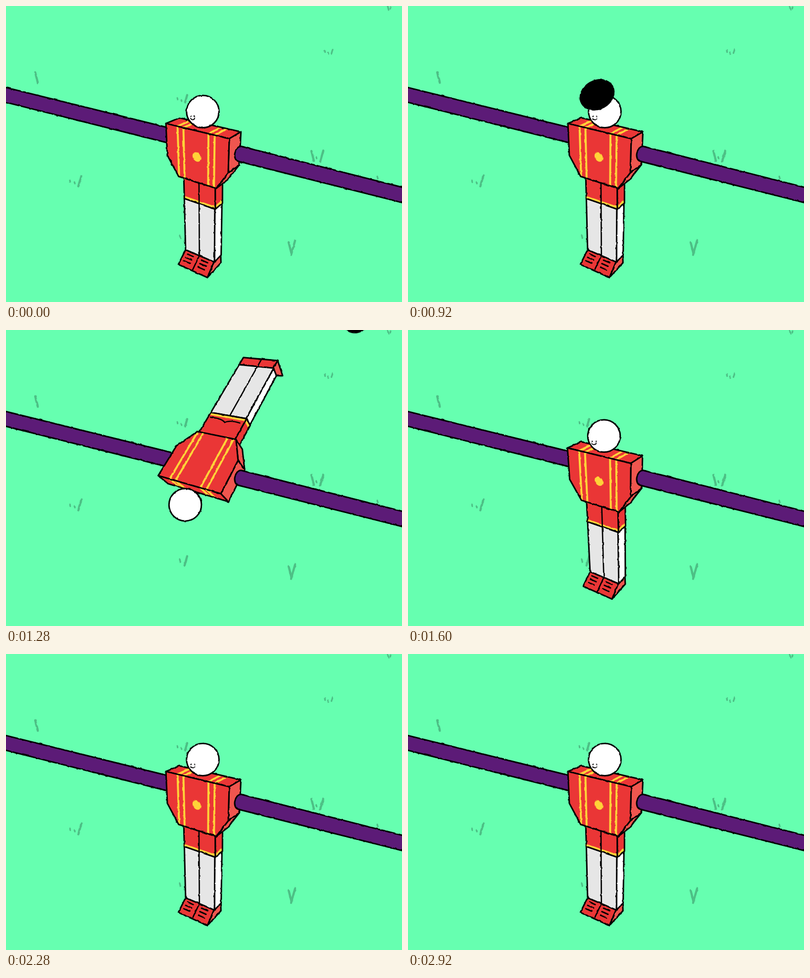
Animation of 800 by 600 pixels, one loop 3000 ms. Source, as an HTML page:

```html
<!DOCTYPE html>
<html lang="en">
<head>
<meta charset="utf-8">
<title>Table football header</title>
<style>
html, body { margin: 0; width: 100%; height: 100%; overflow: hidden; background: #66ffb0; }
svg { display: block; width: 100vw; height: 100vh; }
</style>
</head>
<body>
<svg viewBox="0 0 800 600" preserveAspectRatio="none">
  <defs>
    <filter id="rough" filterUnits="userSpaceOnUse" x="-20" y="-20" width="840" height="640" color-interpolation-filters="sRGB">
      <feTurbulence id="noise" type="fractalNoise" baseFrequency="0.13" numOctaves="1" seed="1"/>
      <feDisplacementMap in="SourceGraphic" scale="3" xChannelSelector="R" yChannelSelector="G"/>
    </filter>
  </defs>
  <rect width="800" height="600" fill="#66ffb0"/>
  <g filter="url(#rough)" stroke-linecap="round" stroke-linejoin="round">
    <g id="grass" fill="none" stroke="#4dbf85"></g>
    <path d="M-15 161.5L345 251V282L-15 191.5Z" fill="#5c1b77" stroke="#000" stroke-width="3"/>
    <g id="player"></g>
    <path d="M830 375L475 284.5C462 284 456 312 470 315L830 406Z" fill="#5c1b77" stroke="#000" stroke-width="3"/>
    <g id="ball"></g>
  </g>
</svg>
<script>
const RED = '#ea3636', SIDE = '#ef564f', YELLOW = '#ffd338', GREY = '#e6e6e6';
const LOOP = 3000;
const byId = id => document.getElementById(id);

// A left blade, a right blade leaning out, and a speck between them if there is room
function tuft(x, y, gap, left, right) {
  const blade = (bx, tall, slant) => tall
    ? `<path d="M${bx} ${y - tall / 2}l${tall * slant} ${tall}" stroke-width="${tall < 10 ? 3.2 : 4.4}"/>` : '';
  return blade(x, left, 0.25) + blade(x + gap, right, -0.28) +
    (gap > 15 ? `<path d="M${x + gap * 0.4} ${y + 2}l1 3" stroke-width="3.2"/>` : '');
}
byId('grass').innerHTML = [
  tuft(346, 188, 20, 3, 15), tuft(644, 92, 16, 3, 9), tuft(129, 355, 23, 3, 21),
  tuft(617, 304, 24, 20, 22), tuft(351, 468, 15, 6, 19), tuft(571, 490, 13, 22, 29),
  tuft(59, 145, 0, 21, 0), tuft(750, 348, 0, 5, 0), tuft(771, 4, 6, 8, 3)
].join('');

// Eased swing between a few poses: drawing number, lean in degrees
const poses = [[11, 0], [15, 131], [18, -8.5], [19, 1.8], [22, -1], [24, 0]];
function lean(step) {
  const i = poses.findIndex(p => step < p[0]);
  if (i < 1) return 0;
  const [s0, from] = poses[i - 1], [s1, to] = poses[i];
  const k = (step - s0) / (s1 - s0);
  return from + (to - from) * k * k * (3 - 2 * k);
}

const AXIS = -4; // height of the pivot
let cos = 1, sin = 0;

// a: along the rod, h: up the body, d: out of the chest
function project([a, h, d]) {
  const up = AXIS + (h - AXIS) * cos - d * sin, front = (h - AXIS) * sin + d * cos;
  const w = 1 - 0.00073 * a - 0.0006 * up - 0.00135 * front;
  return [399 + (a - 0.7 * front) / w, 281 + (0.26 * a - up + 0.39 * front) / w];
}

const pathOf = pts => 'M' + pts.map(p => project(p).map(v => v.toFixed(2)).join(' ')).join('L');
const line = (pts, color, width) =>
  `<path d="${pathOf(pts)}" fill="none" stroke="${color}" stroke-width="${width}"/>`;

function facing(pts) {
  const q = pts.map(project);
  return q.reduce((sum, [x, y], i) => {
    const [u, v] = q[(i + 1) % q.length];
    return sum + x * v - u * y;
  }, 0) > 0;
}

function face(pts, fill, detail = '') {
  if (!facing(pts)) return '';
  const d = pathOf(pts) + 'Z';
  return `<path d="${d}" fill="${fill}"/>${detail}<path d="${d}" fill="none" stroke="#000" stroke-width="3"/>`;
}

// Solid between a front and a back outline with the same number of corners
function prism(front, back, fill, side, detail = {}) {
  const edges = front.map((p, i) => {
    const j = (i + 1) % front.length;
    return face([p, back[i], back[j], front[j]], i ? side : fill, detail[i]);
  });
  return edges.join('') + face([...back].reverse(), fill, detail.back) + face(front, fill, detail.front);
}

function torso() {
  const shape = [[-63.5, 33.5], [60, 33.5], [60, -32], [38, -71], [-40, -71], [-63.5, -32]];
  const at = d => shape.map(p => [...p, d]);
  const stripes = (from, to) => [-39, -27, 22, 33.6].map(a =>
    line([[a, ...from], [a, ...to]], YELLOW, 4)).join('');
  const badge = Array.from({ length: 16 }, (_, i) => {
    const t = i * Math.PI / 8;
    return [-1 + 8.5 * Math.cos(t), -18 + 9.5 * Math.sin(t), 18];
  });
  return prism(at(18), at(-18), RED, SIDE, {
    0: stripes([33.5, 18], [33.5, -18]),
    back: stripes([33.5, -18], [-71, -18]),
    front: stripes([33.5, 18], [-71, 18]) + `<path d="${pathOf(badge)}Z" fill="${YELLOW}"/>`
  });
}

// Legs: the back is a little wider on the left than the front
const FRONT = 12, BACK = -11, HEM = -122, ANKLE = -251, SOLE = -272;
const slab = (top, bottom, d) => {
  const l = d < 0 ? -41 : -33.5;
  return [[l, top, d], [32, top, d], [33, bottom, d], [l, bottom, d]];
};
const seam = (top, bottom, d, e = d) => line([[-1, top, d], [-1, bottom, e]], '#000', 2.6);

function shorts() {
  const y = HEM + 3.5;
  const hem = d => line([[d < 0 ? -41 : -33.5, y, d], [32, y, d]], YELLOW, 4.5);
  const [p, q, r, s, t] = [[-36, -111], [-12, -113], [-3, -105], [3, -113], [25, -110]]
    .map(v => project([...v, BACK]).join(' '));
  const fold = `<path d="M${p}Q${q} ${r}Q${s} ${t}" fill="none" stroke="#000" stroke-width="2.6"/>`;
  return prism(slab(-66, HEM, FRONT), slab(-66, HEM, BACK), RED, RED, {
    1: line([[32, y, FRONT], [32, y, BACK]], YELLOW, 4.5),
    front: hem(FRONT) + seam(-66, HEM, FRONT),
    back: hem(BACK) + fold
  });
}

function socks() {
  return prism(slab(HEM, ANKLE, FRONT), slab(HEM, ANKLE, BACK), GREY, '#fff', {
    front: seam(HEM, ANKLE, FRONT), back: seam(HEM, ANKLE, BACK)
  });
}

function shoes() {
  const toe = 35;
  const front = slab(ANKLE, SOLE, FRONT).map(([a, h, d], i) => [a, h, i > 1 ? toe : d]);
  let laces = '';
  for (const mid of [-19, 14])
    for (const t of [0.2, 0.43, 0.66])
      laces += line([-7, 7].map(x => [mid + x, ANKLE + (SOLE - ANKLE) * t, FRONT + (toe - FRONT) * t]), '#000', 2.8);
  return prism(front, slab(ANKLE, SOLE, BACK), RED, SIDE, {
    front: laces + seam(ANKLE, SOLE, FRONT, toe),
    back: seam(ANKLE, SOLE, BACK),
    2: seam(SOLE, SOLE, toe, BACK)
  });
}

function head() {
  const [x, y] = project([0, 65, 2]);
  let out = `<circle cx="${x}" cy="${y}" r="32.8" fill="#fff" stroke="#000" stroke-width="3"/>`;
  if (0.85 * cos - 0.6 * sin > 0.1) {
    const fx = x - 20.3 * cos, fy = y + 29 * (0.39 * cos + sin);
    out += `<g transform="translate(${fx} ${fy})"><circle cx="-3.5" cy="-2.2" r="1.3"/><circle cx="3.8" cy="-1.5" r="1.3"/>` +
      '<path d="M-4.3 2.2Q-2.8 5.6 .2 5.4Q3 5 4 1.8" fill="none" stroke="#000" stroke-width="1.8"/></g>';
  }
  return out;
}

function player(step) {
  const angle = lean(step) * Math.PI / 180;
  cos = Math.cos(angle);
  sin = Math.sin(angle);
  const parts = [shoes(), socks(), shorts(), torso(), head()];
  const fromAbove = facing([[-60, 33, 18], [-60, 33, -18], [60, 33, -18], [60, 33, 18]]);
  return (fromAbove ? parts : parts.reverse()).join('');
}

// Flies in, is squashed on the head, hops over and is heeled away
function ball(step) {
  if (step < 8 || step > 15) return '';
  const squash = step === 11 ? 3.5 : 0;
  const r = 33.5 - Math.max(0, step - 11) * 1.4;
  const k = (step - 11) / 3;
  let x, y;
  if (k <= 0) {
    x = 382 + 337 * k;
    y = 28 + 152 * (1 + k) ** 2;
  } else if (k <= 1) {
    x = 382 + 190 * k;
    y = 180 - 65 * k - 300 * k * (1 - k);
  } else {
    x = 572 + 399 * (k - 1);
    y = 115 - 408 * (k - 1);
  }
  return `<ellipse rx="${r + squash}" ry="${r - squash}" transform="translate(${x} ${y}) rotate(-30)"/>`;
}

// Twelve drawings a second; the first of each second stays longer
function stepAt(ms) {
  const part = ms % 1000;
  return Math.floor(ms / 1000) * 12 + (part < 120 ? 0 : 1 + Math.floor((part - 120) / 80));
}

let shown = -1;
function draw(now) {
  const step = stepAt(now % LOOP);
  if (step !== shown) {
    shown = step;
    byId('noise').setAttribute('seed', 1 + step % 4);
    byId('player').innerHTML = player(step);
    byId('ball').innerHTML = ball(step);
  }
}

let start = null;
function tick(now) {
  if (start === null) start = now;
  draw(Math.max(0, now - start));
  requestAnimationFrame(tick);
}
draw(0);
requestAnimationFrame(tick);
</script>
</body>
</html>
```
